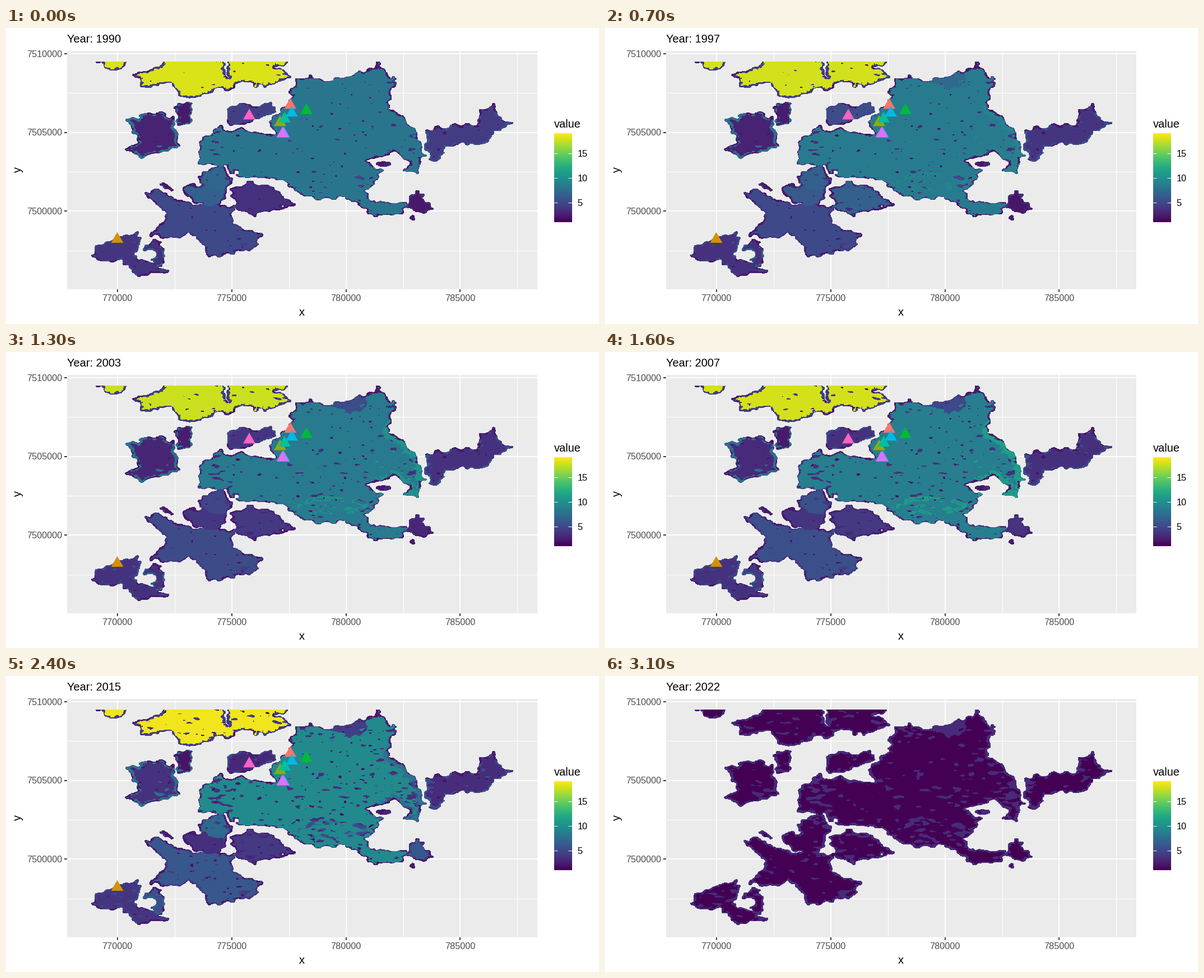
A matplotlib script that plays this animation: 1058 by 529 pixels, repeating every 3.2 s.

```python
import numpy as np
import matplotlib.pyplot as plt
from matplotlib.animation import FuncAnimation
from matplotlib.path import Path
from matplotlib.patches import Polygon, Rectangle

W, H, FRAMES = 1058, 529, 32
LAST = FRAMES - 1
X0, X1, Y0, Y1 = 147.5, 909, 60, 446
SHAPE = ROWS, COLS = 456, 622
rng = np.random.default_rng(7)

X, Y = np.meshgrid(np.linspace(X0, X1, COLS), np.linspace(Y0, Y1, ROWS))


def noise(sx, sy):
    """Smooth unit noise with correlation lengths in pixels."""
    fx = np.fft.fftfreq(COLS, (X1 - X0) / COLS)
    fy = np.fft.fftfreq(ROWS, (Y1 - Y0) / ROWS)[:, None]
    low = np.exp(-20 * ((fx * sx) ** 2 + (fy * sy) ** 2))
    n = np.fft.ifft2(np.fft.fft2(rng.standard_normal(SHAPE)) * low).real
    return n / n.std()


def erode(m, diagonal):
    p = np.pad(m, 1, mode="edge")
    up, mid, down = p[:-2], p[1:-1], p[2:]
    rows = (up & mid & down) if diagonal else mid
    r = rows[:, :-2] & rows[:, 1:-1] & rows[:, 2:]
    return r & up[:, 1:-1] & down[:, 1:-1]


def smooth(m, n):
    """Morphological opening, which leaves rounded lobes."""
    for k in range(n):
        m = erode(m, k % 2)
    for k in range(n):
        m = ~erode(~m, k % 2)
    return m


# Ragged coastlines come from sampling the outlines at shifted places.
warped = np.column_stack([
    (X + 2.8 * noise(4, 3)).ravel(),
    np.maximum(Y + 2 * noise(4, 3), Y0).ravel()])
label = np.zeros(SHAPE, int)
cores, rims, widths = [[1] * 4], [1], [0]


def inside(*points):
    return Path(points).contains_points(warped).reshape(SHAPE)


def region(core, rim, *masks, width=3):
    """Core values for 1990, 1994, 2000 and 2019, and one for the rim."""
    cores.append(core)
    rims.append(rim)
    widths.append(width)
    for m in masks:
        label[m] = len(rims) - 1
    return len(rims) - 1


# Northern strip
region([18, 18.2, 17.3, 19], 4.3,
       inside((158, 58), (184, 78), (208, 77), (216, 58)),
       inside((222, 82), (275, 71), (274, 58), (512, 58), (480, 70),
              (508, 87), (462, 108), (430, 97), (412, 98), (408, 113),
              (375, 110), (330, 126), (307, 122), (298, 95), (250, 109)),
       width=4)

# Large central body, its north-eastern wedge and its eastern margin
MAIN = region(
    [8, 9, 8, 10], 3.4,
    inside((503, 135), (519, 92), (542, 82), (565, 93), (636, 83),
           (660, 60), (701, 97), (684, 105), (684, 144), (711, 164),
           (746, 208), (737, 261), (700, 254), (657, 263), (661, 284),
           (639, 290), (660, 312), (713, 311), (706, 331), (655, 338),
           (607, 304), (555, 307), (510, 290), (475, 266), (425, 270),
           (390, 249), (339, 245), (346, 208), (372, 172), (396, 184),
           (418, 179), (440, 190), (480, 189), (466, 170)), width=2)
WEDGE = region([8, 9, 5.5, 4], 3, inside((566, 95), (648, 76), (630, 109)),
               width=2)
EAST = region([8, 9, 9, 7.4], 5, width=2)

# Limbs below the western end
region([7, 8.8, 4.2, 8], 4,
       inside((341, 262), (385, 247), (403, 268), (389, 296), (345, 283)))
region([6.5, 8, 4, 3.3], 3.5,
       inside((312, 284), (328, 278), (394, 291), (378, 319), (330, 312)))
region([2, 2.3, 2.4, 2.5], 4, inside((266, 281), (284, 273), (304, 295)))

# Islands to the west and north-west
region([4.4, 6.5, 4, 2.8], 5,
       inside((391, 171), (400, 133), (455, 139), (470, 128), (480, 149),
              (428, 174)))
region([2.3, 2.2, 2.6, 1.8], 7.7,
       inside((303, 130), (331, 130), (329, 174), (304, 171)))
region([2.8, 2.6, 2.8, 3.8], 7.4,
       inside((211, 163), (272, 147), (301, 162), (306, 214), (237, 231),
              (213, 216), (237, 203)), width=5)

# Eastern island
region([4.2, 4, 3.6, 3.2], 5.5,
       inside((746, 181), (845, 169), (848, 144), (872, 136), (887, 164),
              (909, 172), (870, 185), (860, 206), (782, 212), (773, 238),
              (752, 234)))

# Southern and south-western land
region([3.6, 9, 4, 4], 3,
       inside((402, 288), (432, 277), (470, 281), (515, 316), (440, 336),
              (404, 324)))
region([5, 5, 5, 6.1], 4.2,
       inside((247, 297), (268, 289), (330, 315), (405, 317), (403, 352),
              (460, 370), (438, 395), (357, 412), (338, 369), (250, 376),
              (288, 335)))
region([3.7, 3.5, 3.6, 3.8], 5,
       inside((147, 408), (158, 391), (239, 364), (231, 411), (299, 436),
              (238, 446), (205, 417), (175, 419)))
region([3.5, 4, 3, 6], 6.8,
       inside((243, 386), (277, 379), (288, 425), (262, 426)))

# Islets, lagoon and strait
region([2.2, 2, 2.2, 7], 3.4,
       inside((709, 319), (732, 289), (762, 322), (745, 333)),
       inside((711, 344), (728, 332), (735, 347)))
label[inside((640, 241), (700, 218), (716, 248), (685, 258))] = 0
label[inside((384, 58), (393, 58), (399, 90))] = 0
label[np.hypot((X - 256) / 11, (Y - 405) / 8) < 1] = 0
region([2] * 4, 3, np.hypot((X - 673) / 14, (Y - 243) / 5) < 1)

land = smooth(label > 0, 2)
label[~land] = 0
depth = np.zeros(SHAPE)
inner = land
for k in range(14):
    depth += inner
    inner = erode(inner, k % 2)

fine, patch, speck = noise(2, 1.4), noise(9, 6), noise(2.4, 1.3)
streak = noise(4.5, 1.8)


def hill(x, y, sx, sy):
    return np.exp(-((X - x) / sx) ** 2 - ((Y - y) / sy) ** 2)


south, east = hill(570, 275, 90, 20), hill(725, 205, 45, 70)
margin = (depth < 9 + 2.5 * fine) & (east > .1)
margin |= (south > .5) & (streak > .6)
label[margin & (label == MAIN)] = EAST

fray = streak + .8 * np.exp(-depth / 4) + 1.1 * (
    south + east + hill(365, 218, 32, 40))
rim_zone = depth + .9 * fine < np.array(widths)[label]
outline = (depth < 3 + fine) & (patch > .2)


def field(i):
    """Raster values for one step; the last one is a hard reset."""
    if i == LAST:
        pale = (depth + fine < 3.8) | (fray > 1.55) | (label == WEDGE)
        v = np.where(pale, 3.2, 1.0)
    else:
        core = np.array([np.interp(i, [0, 4, 10, 28], c) for c in cores])
        rim = np.array(rims, float)
        pulse = np.exp(-((i - 16) / 4) ** 2)
        core[EAST] += 2.6 * pulse
        rim[EAST] += 5 * pulse
        t = i / LAST
        v = core[label]
        edge = rim_zone | (fray > 2.7 - t)
        v[edge] = rim[label][edge]
        v[speck > 2.45 - .6 * t ** 2] = 1.9
        v[outline] = 2.2
    return np.ma.masked_where(~land, v)


plt.rcParams["font.family"] = "Liberation Sans"
fig = plt.figure(figsize=(W / 100, H / 100), dpi=100, facecolor="white")
ax = fig.add_axes([0, 0, 1, 1])


def text(x, y, s, px=16.2, color="black", **kw):
    return ax.text(x, y, s, fontsize=px * .72, color=color, **kw)


def line(xs, ys, px=1.9, color="white"):
    ax.plot(xs, ys, lw=px * .72, color=color, solid_capstyle="butt")


# Panel, grid and axes
LEFT, RIGHT, TOP, BOTTOM = 109, 948, 41, 466.5
INK, GREY = "#333333", "#4D4D4D"
ax.add_patch(Rectangle((LEFT, TOP), RIGHT - LEFT, BOTTOM - TOP, fc="#EBEBEB"))
xs = [198.7 + 203.9 * k for k in range(4)]
ys = [327.3 - 140.8 * k for k in range(3)]
for x in xs:
    line([x + 102] * 2, [TOP, BOTTOM], 1)
for y in ys:
    line([LEFT, RIGHT], [y + 70.4] * 2, 1)
for k, x in enumerate(xs):
    line([x, x], [TOP, BOTTOM])
    line([x, x], [BOTTOM, BOTTOM + 5], color=INK)
    text(x, 488, 770000 + 5000 * k, color=GREY, ha="center")
for k, y in enumerate(ys):
    line([LEFT, RIGHT], [y, y])
    line([LEFT - 5, LEFT], [y, y], color=INK)
    text(100, y + 5.8, 7500000 + 5000 * k, color=GREY, ha="right")
text(528, 514, "x", 20, ha="center")
text(21, 253.5, "y", 20, ha="center", va="center", rotation=90)
title = text(LEFT, 26, "", 20)

# Colour bar
B0, B1, BT, BB = 978, 1009.5, 189, 347.5
text(B0, 177.5, "value", 20)
ax.imshow(np.linspace(1, 0, 256)[:, None], cmap="viridis", aspect="auto",
          extent=(B0, B1, BB, BT))
for v in (5, 10, 15):
    y = BB - (v - 1) * (BB - BT) / 18
    for x in (B0, B1 - 6.3):
        line([x, x + 6.3], [y, y], 1)
    text(B1 + 10, y + 5.8, v)

raster = ax.imshow(field(0), cmap="viridis", vmin=1, vmax=19, aspect="auto",
                   interpolation="nearest", extent=(X0, X1, Y1, Y0), zorder=3)

sites = [(507, 138, "#F8766D"), (198.5, 377.5, "#D39200"),
         (489, 169, "#93AA00"), (536, 147.5, "#00BA38"),
         (497, 162.5, "#00C19F"), (510, 152, "#00B9E3"),
         (495.5, 189, "#619CFF"), (493.5, 189, "#DB72FB"),
         (434, 157, "#FF61C3")]
marks = [ax.add_patch(Polygon([(x, y - 12.7), (x - 11, y + 6.4),
                               (x + 11, y + 6.4)], fc=c, lw=0, zorder=4))
         for x, y, c in sites]

ax.set_xlim(0, W)
ax.set_ylim(H, 0)
ax.axis("off")


def update(i):
    title.set_text(f"Year: {int(1990 + i * 32 / LAST + .5)}")
    raster.set_data(field(i))
    for m in marks:
        m.set_visible(i < LAST)
    return [raster, title, *marks]


anim = FuncAnimation(fig, update, frames=FRAMES, interval=100, repeat=True,
                     repeat_delay=0, blit=False)
plt.show()
```
